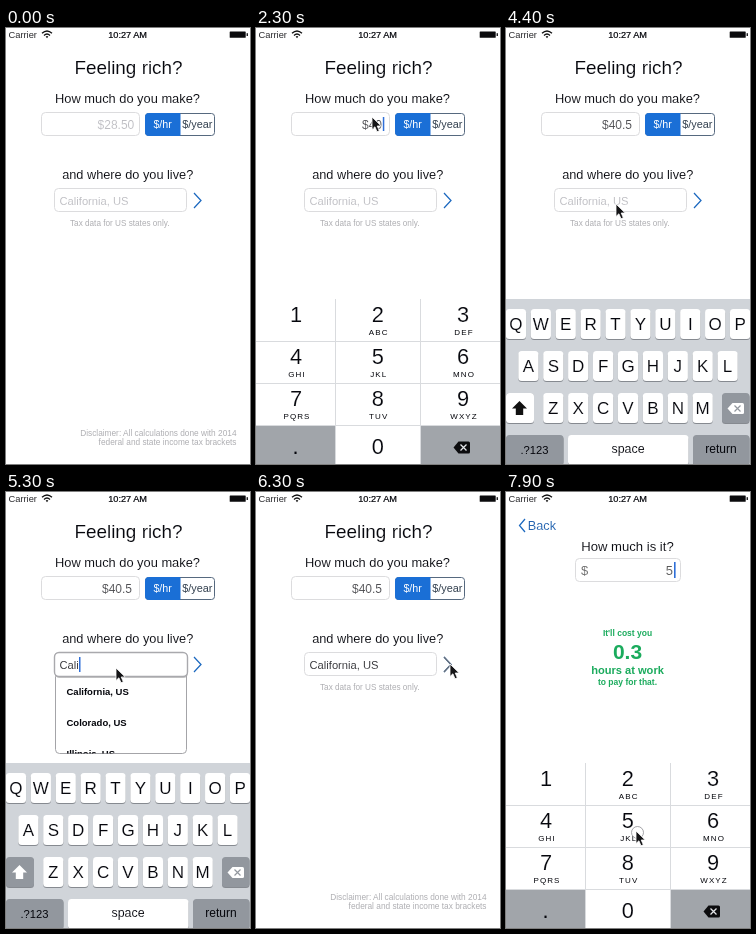
Write an HTML page that moves like this. It is 244x436 px and loops after 8 s.

```html
<!DOCTYPE html>
<html lang="en">
<head>
<meta charset="utf-8">
<title>Feeling rich?</title>
<style>
html, body { margin: 0; width: 100%; height: 100%; overflow: hidden; background: #fff; }
svg { display: block; width: 100%; height: 100%; }
text { font-family: "Liberation Sans", Arial, sans-serif; fill: #05060c; stroke: #fff; stroke-width: .009em; }
.mid { text-anchor: middle; }
.end { text-anchor: end; }
.solid { stroke: none; }
.semi { stroke: #05060c; stroke-width: .025em; }
.bold { font-weight: 700; stroke: none; }
.hint { fill: #bcbcc1; }
.note { fill: #aeaeb2; stroke: none; }
.field { fill: #fff; stroke: #dcdcde; }
.caret { fill: #2f6fd8; }
.green { fill: #1bab5d; }
.line { fill: none; stroke: #1b68bf; stroke-width: 1.25; }

#first, #second, #pad, #letters, #cursor { animation: 8s linear infinite; }
#first { animation-name: leave; }
#second { animation-name: enter; }
#pad { animation-name: pad; }
#letters { animation-name: letters; }
#cursor { animation-name: cursor; }

@keyframes leave {
  0%, 80.625% { transform: none; animation-timing-function: cubic-bezier(.25, .6, .3, 1); }
  86.25%, 100% { transform: translateX(-73px); }
}
@keyframes enter {
  0%, 80.625% { transform: translateX(245px); animation-timing-function: cubic-bezier(.25, .6, .3, 1); }
  86.25%, 100% { transform: none; }
}
@keyframes pad {
  0%, 10% { transform: translateY(170px); animation-timing-function: cubic-bezier(.215, .61, .355, 1); }
  15.9%, 48.99% { transform: none; }
  49%, 85% { transform: translateY(170px); animation-timing-function: cubic-bezier(.215, .61, .355, 1); }
  90.5%, 100% { transform: none; }
}
@keyframes letters {
  0%, 48.99% { transform: translateY(170px); }
  49%, 73.125% { transform: none; animation-timing-function: cubic-bezier(.215, .61, .355, 1); }
  77.9%, 100% { transform: translateY(170px); }
}
@keyframes cursor {
  0%, 3.75% { transform: translate(254px, 160px); animation-timing-function: ease-in-out; }
  8.75%, 42.5% { transform: translate(116px, 89px); animation-timing-function: ease-in-out; }
  46.875%, 70% { transform: translate(110px, 176px); animation-timing-function: ease-in-out; }
  71.875%, 73.75% { transform: translate(88px, 198px); animation-timing-function: ease-in-out; }
  76.875%, 91.875% { transform: translate(194px, 172px); animation-timing-function: ease-in-out; }
  96.25%, 100% { transform: translate(130px, 339px); }
}
</style>
</head>
<body>
<svg viewBox="0 0 244 436">
  <defs>
    <clipPath id="listClip"><rect x="49" y="180" width="132" height="81.5" rx="4"/></clipPath>
  </defs>

  <g id="first">
    <rect width="244" height="436" fill="#fff"/>
    <text class="mid" x="122.5" y="45.5" font-size="18.9">Feeling rich?</text>
    <text class="mid" x="121.5" y="75" font-size="12.85">How much do you make?</text>
    <rect class="field" x="35.5" y="84.5" width="98" height="23" rx="4"/>
    <g id="amount"></g>
    <rect class="caret" x="126.8" y="89" width="1.5" height="14" data-on="800-3920"/>

    <rect x="139.5" y="85.5" width="69" height="22" rx="3" fill="#fff" stroke="#56697f"/>
    <path d="M174 85.5H142.5a3 3 0 0 0-3 3v16a3 3 0 0 0 3 3H174z" fill="#1a6fd6" stroke="#1a6fd6"/>
    <text class="mid solid" x="156.6" y="100" font-size="10.7" style="fill:#fff">$/hr</text>
    <text class="mid solid" x="191.3" y="100" font-size="10.9" style="fill:#33404f">$/year</text>

    <text class="mid" x="121.7" y="151" font-size="12.75">and where do you live?</text>
    <text class="note" x="64" y="198" font-size="8.2">Tax data for US states only.</text>
    <rect class="field" x="48.5" y="160.5" width="132" height="23" rx="4"/>
    <g data-on="4600-5850">
      <rect x="49.5" y="180.5" width="131" height="81" rx="4" fill="#fff" stroke="#a4a4a8"/>
      <g clip-path="url(#listClip)" font-size="9.5">
        <text class="bold" x="60.5" y="203">California, US</text>
        <text class="bold" x="60.5" y="234">Colorado, US</text>
        <text class="bold" x="60.5" y="265">Illinois, US</text>
      </g>
      <rect x="49" y="162" width="133" height="24" rx="4.5" fill="#777" opacity=".4"/>
      <rect x="48.5" y="160.5" width="133" height="24" rx="4.5" fill="#fff" stroke="#a9a9ad" stroke-width="1.4"/>
    </g>
    <g id="place"></g>
    <path class="line" d="M188 165l7 7.5-7 7.5"/>
    <path class="line" d="M188 165l7 7.5-7 7.5" style="stroke:#6c7077" data-on="6250-6500"/>

    <g font-size="8.3">
      <text class="note end" x="230.5" y="408">Disclaimer: All calculations done with 2014</text>
      <text class="note end" x="230.5" y="417">federal and state income tax brackets</text>
    </g>
  </g>

  <g id="second">
    <rect width="244" height="436" fill="#fff"/>
    <path class="line" d="M19 27l-5.5 6.5 5.5 6.5"/>
    <text x="21.8" y="38" font-size="12.7" style="fill:#1d5fae">Back</text>
    <text class="mid" x="121.5" y="59" font-size="13.1">How much is it?</text>
    <rect class="field" x="69.5" y="66.5" width="105" height="23" rx="4"/>
    <text x="75" y="83" font-size="13" style="fill:#666">$</text>
    <text class="end" x="167" y="83" font-size="13" style="fill:#555" data-on="7800-8000">5</text>
    <rect class="caret" x="168" y="70" width="1.6" height="16"/>
    <g data-on="7800-8000">
      <text class="mid bold green" x="121.5" y="143.5" font-size="8.5">It'll cost you</text>
      <text class="mid bold green" x="121.5" y="166.5" font-size="21">0.3</text>
      <text class="mid bold green" x="121.5" y="182" font-size="11.1">hours at work</text>
      <text class="mid bold green" x="121.5" y="192.8" font-size="8.5">to pay for that.</text>
    </g>
  </g>

  <g id="pad">
    <rect y="271" width="244" height="170" fill="#fff"/>
    <path d="M0 397h79.5v44H0zM164.5 397H244v44h-79.5z" fill="#a1a5aa"/>
    <path d="M79.5 271v170M164.5 271v170M0 313.5h244M0 355.5h244M0 397.5h244" stroke="#d9dbde"/>
    <g id="digits"></g>
    <path d="M197.5 419.5l5-6h10q1.500 0 1.500 1.500v9q0 1.500-1.500 1.500h-10z" fill="#0c0c0e"/>
    <path d="M204.500 416.500l6 6m0-6l-6 6" stroke="#e4e6e9" stroke-width="1.3"/>
  </g>

  <g id="letters">
    <rect y="271" width="244" height="170" fill="#d0d4d9"/>
    <g id="keys"></g>
    <path d="M13.5 373l7.5 7.5h-3.800v6.500h-7.400v-6.500H6z" fill="#fff"/>
    <g data-on="3900-4600">
      <rect y="365" width="28" height="30" rx="3.5" fill="#fff"/>
      <path d="M13.5 373l7.5 7.5h-3.800v6.500h-7.400v-6.500H6z" fill="#111"/>
    </g>
    <path d="M221.5 380.5l5-5.500h10q1.500 0 1.500 1.500v8q0 1.500-1.500 1.500h-10z" fill="#fff"/>
    <path d="M228.5 377.5l6 6m0-6l-6 6" stroke="#92979e" stroke-width="1.2"/>
  </g>

  <g id="status">
    <text class="solid" x="2.5" y="10" font-size="9.3" style="fill:#2a2a2e">Carrier</text>
    <g fill="none" stroke="#111" stroke-width="1.3">
      <path d="M36 5.3q5-4.600 10 0M38 7.400q3-2.800 6 0"/>
      <path d="M39.700 8.600q1.300-1.200 2.600 0L41 10.200z" fill="#111" stroke="none"/>
    </g>
    <text class="mid semi" x="121.6" y="10" font-size="9.2">10:27 AM</text>
    <rect x="223.7" y="3.5" width="16" height="6.3" rx=".6" fill="#0b0b0d"/>
    <rect x="240.6" y="5.2" width="1.300" height="2.800" fill="#0b0b0d"/>
  </g>

  <g id="cursor">
    <circle cx="1.5" cy="1.5" r="6" fill="#fff" fill-opacity=".3" stroke="#8d8d92" stroke-width=".8"
      data-on="720-840 3760-3920 5780-5900 6350-6460 7760-8000"/>
    <path d="M0 0v12.500l2.900-2.700 2.100 4.900 2.300-1-2.100-4.700H9.200z" fill="#151517" stroke="#fff" stroke-width=".8"/>
  </g>
</svg>

<script>
const LOOP = 8000;
const byId = id => document.getElementById(id);
const label = (x, y, size, text, cls = "mid", style = "") =>
  `<text class="${cls}" x="${x}" y="${y}" font-size="${size}" style="${style}">${text}</text>`;

// Number pad
const groups = ["", "ABC", "DEF", "GHI", "JKL", "MNO", "PQRS", "TUV", "WXYZ"];
const columns = [40, 121.7, 207];
byId("digits").innerHTML = groups.map((sub, i) => {
  const x = columns[i % 3], y = 294.3 + 42 * Math.floor(i / 3);
  return label(x, y, 21.8, i + 1) +
    label(x + 1, y + 12.2, 8, sub, "mid solid", "letter-spacing:1.1px");
}).join("") + label(121.7, 425.5, 21.8, 0) + label(39.5, 425.5, 21.8, ".", "mid solid");

// Letter keyboard
const key = (x, y, w, fill) =>
  `<rect x="${x}" y="${y + 1}" width="${w}" height="30" rx="3.5" fill="#868a90"/>` +
  `<rect x="${x}" y="${y}" width="${w}" height="30" rx="3.5" fill="${fill}"/>`;
const dark = "#92979e";
const rows = ["QWERTYUIOP", "ASDFGHJKL", "ZXCVBNM"];
byId("keys").innerHTML = rows.map((row, r) => [...row].map((ch, i) => {
  const x = 122 + (i - (row.length - 1) / 2) * 24.9, y = 281 + 42 * r;
  return key(x - 10.1, y, 20.2, "#fff") + label(x, y + 21, 17, ch);
}).join("")).join("") +
  key(0, 365, 28, dark) + key(216, 365, 27.5, dark) +
  key(0, 407, 57.5, dark) + key(62, 407, 120.5, "#fff") + key(187, 407, 56.5, dark) +
  label(28.5, 426, 11.2, ".?123", "mid solid") +
  label(122, 425, 12.4, "space") +
  label(215, 425, 12, "return", "mid solid");

// Typed text: each entry lasts until the next one starts
const typed = (list, draw) => list.map(([start, text], i) =>
  `<g data-on="${start}-${i + 1 < list.length ? list[i + 1][0] : LOOP}">${draw(text, i)}</g>`).join("");

byId("amount").innerHTML = typed(
  [[0, "$28.50"], [1700, "$4"], [2000, "$40"], [2500, "$40."], [3000, "$40.5"]],
  (text, i) => label(i ? 126 : 128.3, 101, 12, text, i ? "end" : "end hint", i ? "fill:#4a4a4e" : ""));

const caretAt = (x, on) =>
  `<rect class="caret" x="${x}" y="165" width="1.5" height="15" data-on="${on}"/>`;
byId("place").innerHTML = typed(
  [[0, "California, US"], [4600, "C"], [4700, "Ca"], [4900, "Cal"], [5100, "Cali"], [5850, "California, US"]],
  (text, i) => label(53.5, 177, 11.2, text, i ? "" : "hint", i ? "fill:#2c2c30" : "")) +
  caretAt(53.7, "3920-4350") + caretAt(61.8, "4600-4700") +
  caretAt(68, "4700-4900") + caretAt(70.5, "4900-5100") + caretAt(73, "5100-5850");

// Show elements only inside their time windows
for (const el of document.querySelectorAll("[data-on]")) {
  const spans = el.dataset.on.split(" ").map(span => span.split("-").map(Number));
  const frames = spans[0][0] > 0 ? [{ offset: 0, opacity: 0 }] : [];
  for (const [from, to] of spans) {
    frames.push({ offset: from / LOOP, opacity: 1 });
    if (to < LOOP) frames.push({ offset: to / LOOP, opacity: 0 });
  }
  frames.push({ offset: 1, opacity: frames[frames.length - 1].opacity });
  frames.forEach(f => f.easing = "step-end");
  el.animate(frames, { duration: LOOP, iterations: Infinity });
}

// One shared clock for every animation
const began = document.timeline.currentTime || 0;
document.getAnimations().forEach(a => a.startTime = began);
</script>
</body>
</html>
```
